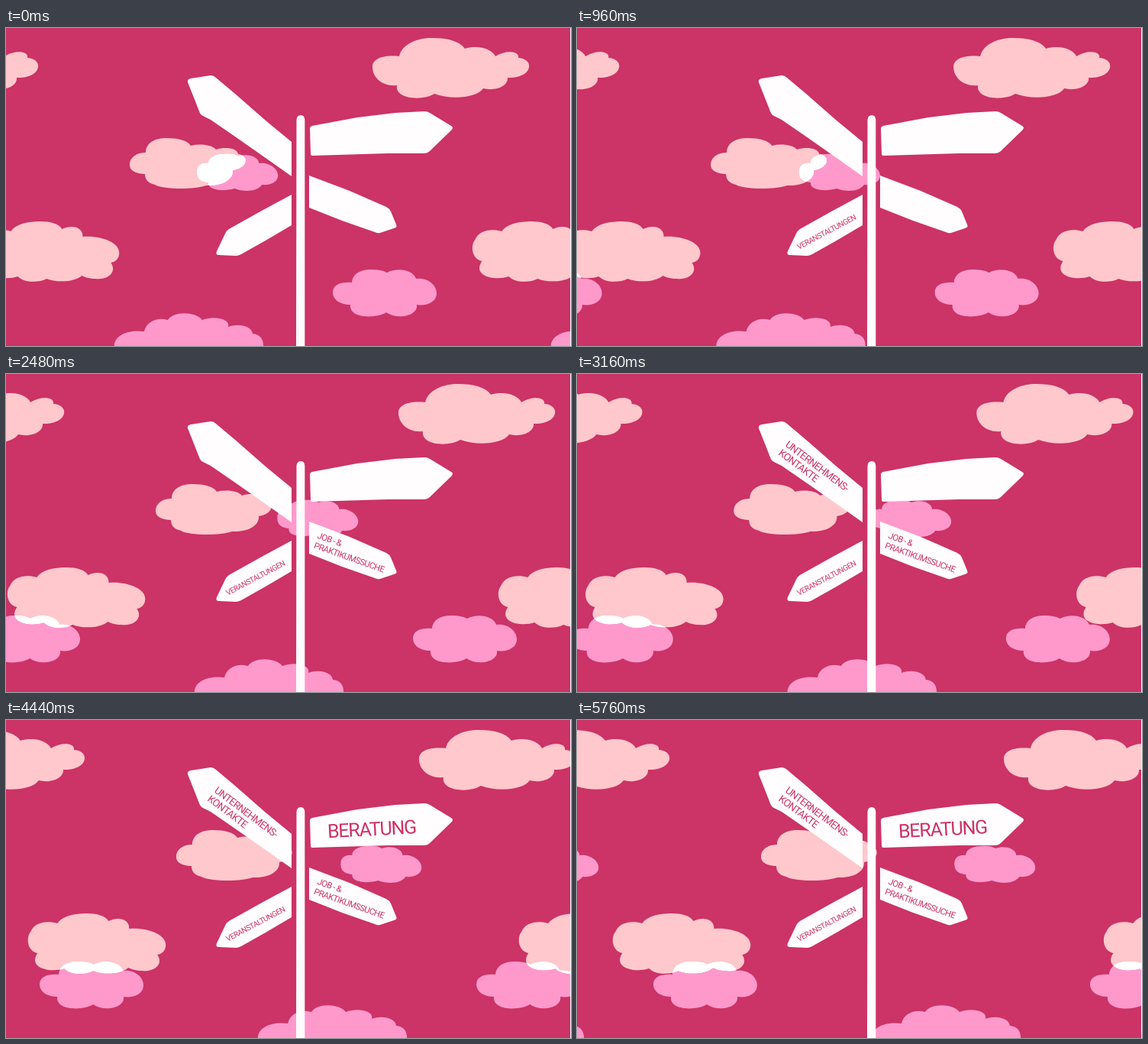
Write an HTML page with a canvas that moves like this. It is 740 px wide and 416 px high and loops after 5.8 s.

```html
<!DOCTYPE html>
<html lang="de">
<head>
<meta charset="utf-8">
<title>Wegweiser</title>
<style>
  html, body { margin: 0; width: 100%; height: 100%; overflow: hidden; background: #fff; }
  canvas { display: block; }
</style>
</head>
<body>
<canvas id="stage" width="739" height="416"></canvas>
<script>
const ctx = document.getElementById('stage').getContext('2d');
const LOOP = 5800, STEP = 40, RED = '#cc3366';

// Each layer drifts right and repeats sideways; glow is added to the backdrop.
const layers = [
  {
    speed: 0.01372, period: 643, glow: 'rgb(51,149,102)',
    clouds: [
      [0, 'M512,75C492,77 480,64 480,51C480,40 494,35 515,37C519,20 540,13 558,13C578,13 594,17 601,27C618,22 636,27 641,37C655,28 673,30 671,39C682,40 686,46 685,51C684,60 671,66 657,65C658,76 641,83 625,79C616,92 582,94 561,86C545,96 509,93 512,75Z'],
      [-52.7, 'M33,305C19,302 18,284 24,277C29,264 46,262 59,266C66,256 82,253 97,253C111,253 122,256 126,263C141,256 154,262 153,273C176,271 201,280 201,294C201,302 196,306 190,307C199,320 185,330 170,328C162,328 156,326 152,324C142,333 118,333 106,328C94,334 76,333 68,325C50,331 20,325 33,305Z'],
      [0, 'M182,191C170,191 161,186 162,178C163,167 174,163 183,163C183,149 197,144 210,144C225,144 238,147 242,154C255,151 270,153 275,159C287,155 303,157 304,165C318,166 318,183 297,186C298,200 280,207 262,206C245,212 205,211 195,205C186,203 182,198 182,191Z']
    ]
  },
  {
    speed: 0.04236, period: 572, glow: 'rgb(51,102,102)',
    clouds: [
      [-162.7, 'M428,202C415,201 413,194 413,188C413,179 420,176 428,177C428,168 440,165 448,165C456,164 463,165 467,168C480,163 494,169 494,177C507,175 519,184 519,193C519,202 508,206 498,205C492,214 475,215 462,210C448,214 427,213 428,202Z'],
      [0, 'M451,362C437,362 428,355 428,346C428,335 440,332 453,333C454,321 465,316 478,316C487,316 493,317 499,320C512,313 533,316 537,328C553,326 564,337 564,347C564,359 550,364 538,362C540,377 512,382 498,372C486,380 449,381 451,362Z'],
      [0, 'M142,420C139,402 160,394 181,397C184,384 198,378 212,382C218,371 247,370 257,382C272,376 294,380 291,391C305,386 322,390 323,400C334,401 338,408 337,420Z']
    ]
  }
];
for (const layer of layers)
  layer.clouds = layer.clouds.map(([x, d]) => ({ x, path: new Path2D(d) }));

const signs = new Path2D(
  'M238,71Q237,67 242,66L268,62Q272,62 275,65L300,86L340,121L374,149V194L340,170L300,142L268,120L258,115Q255,114 253,109L248,96Z' +
  'M398,131Q398,129 401,128L460,117L510,111L548,109Q552,109 555,111L583,128Q587,130 583,134L555,161Q552,164 547,164L500,164L401,167Q399,167 399,164Z' +
  'M397,193L450,213L498,234Q502,236 504,240L511,257Q513,261 508,262L490,268Q487,269 483,267L440,252L397,235Z' +
  'M374,218L335,239L292,263Q289,265 287,269L276,292Q274,297 279,297L301,298Q304,298 308,296L340,278L374,258Z' +
  'M380,416L380.5,120Q381,114 386,114Q391,114 391.3,120V416Z');

// start time, angle in degrees, font size, lines of [x, baseline, text]
const labels = [
  [400, -28, 10, [[290.5, 290, 'VERANSTALTUNGEN']]],
  [1390, 19.5, 11.3, [[407, 214.5, 'JOB - &'], [402.5, 227.5, 'PRAKTIKUMSSUCHE']]],
  [2480, 37, 13.3, [[272, 94, 'UNTERNEHMENS-'], [263, 105, 'KONTAKTE']]],
  [3450, -3, 25, [[421.5, 154.3, 'BERATUNG']]]
];
const FADE = 280;

function drawClouds(t) {
  ctx.globalCompositeOperation = 'lighter';
  for (const layer of layers) {
    ctx.fillStyle = layer.glow;
    for (const cloud of layer.clouds)
      for (let n = -1; n <= 1; n++) {
        ctx.save();
        ctx.translate(cloud.x + layer.speed * t + n * layer.period, 0);
        ctx.fill(cloud.path);
        ctx.restore();
      }
  }
  ctx.globalCompositeOperation = 'source-over';
}

function drawLabel(t, [start, angle, size, lines]) {
  ctx.globalAlpha = Math.min(1, Math.max(0, (t - start) / FADE));
  ctx.fillStyle = RED;
  ctx.font = `${size}px Roboto, "Liberation Sans", sans-serif`;
  ctx.letterSpacing = `${-size / 20}px`;
  for (const [x, y, text] of lines) {
    ctx.save();
    ctx.translate(x, y);
    ctx.rotate(angle * Math.PI / 180);
    ctx.fillText(text, 0, 0);
    ctx.restore();
  }
  ctx.globalAlpha = 1;
}

function draw() {
  const t = Math.floor(performance.now() % LOOP / STEP) * STEP;
  ctx.fillStyle = RED;
  ctx.fillRect(0, 0, 739, 416);
  drawClouds(t);
  ctx.fillStyle = '#fffdfe';
  ctx.fill(signs);
  for (const label of labels) drawLabel(t, label);
  requestAnimationFrame(draw);
}
draw();
</script>
</body>
</html>
```
